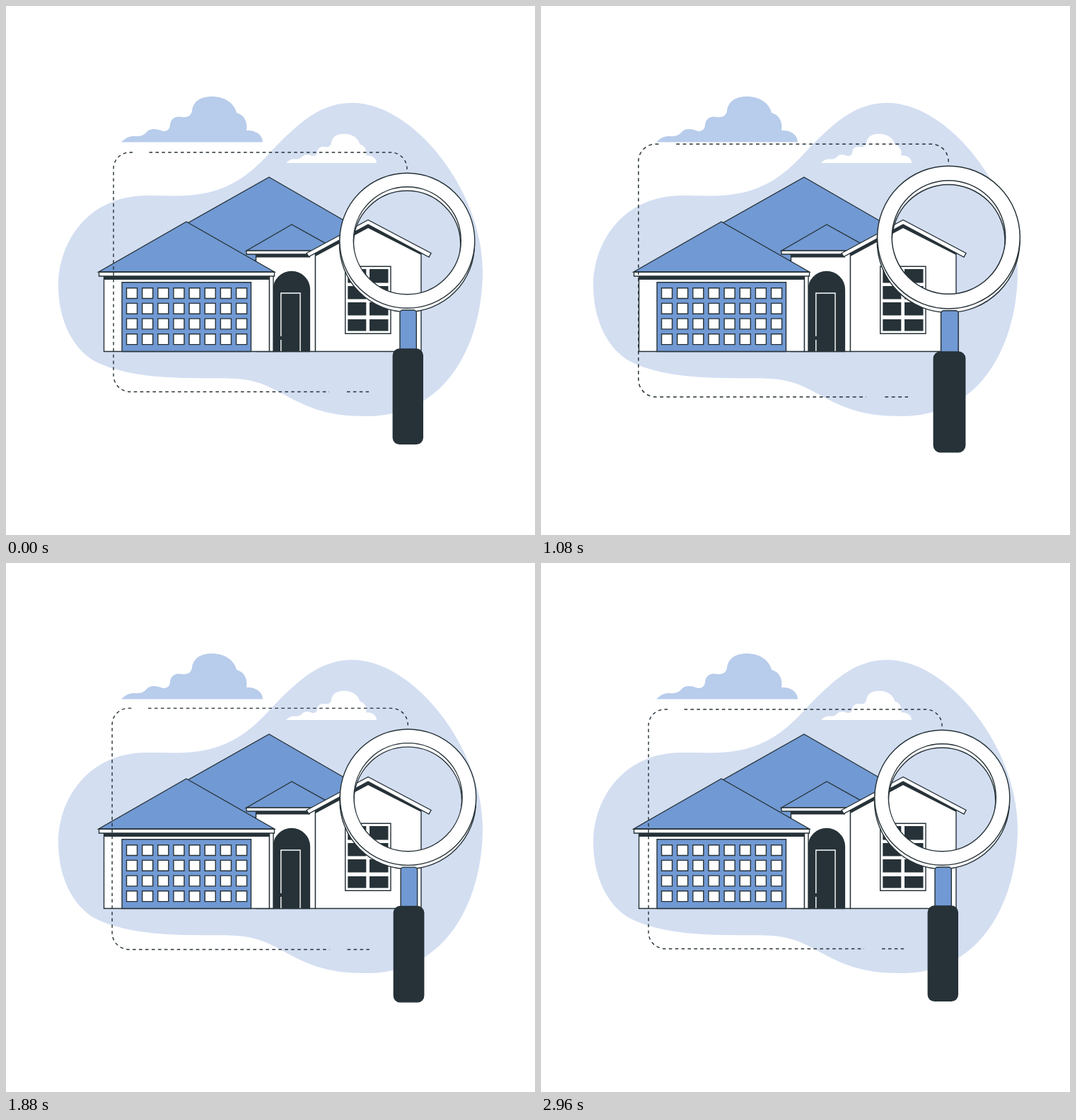
These frames come from a looping animation (748x748 px, 3 s). An HTML page with a canvas:

```html
<!DOCTYPE html>
<html lang="en">
<head>
<meta charset="utf-8">
<title>House search</title>
<style>
  html, body { margin: 0; width: 100%; height: 100%; overflow: hidden; background: #fff; }
  canvas { display: block; }
</style>
</head>
<body>
<canvas id="stage" width="748" height="748"></canvas>
<script>
const ctx = document.getElementById('stage').getContext('2d');
const INK = '#263238', BLUE = '#7199d3', PALE = '#d3def1', SKY = '#b8cceb', WHITE = '#fff';
const LOOP = 3000, FRAMES = 72;

const blob = new Path2D('M490 137C575 137 674 260 674 375C674 470 628 580 510 580' +
  'C450 580 425 567 385 545C345 522 318 527 265 526C210 526 160 520 125 502' +
  'C95 485 74 445 74 395C74 335 115 268 200 268C225 268 235 269 255 268' +
  'C330 264 360 220 385 195C420 160 448 137 490 137Z');

const cloud = new Path2D('M163 192.5C170 186 174 184 182 184C190 185 196 182 199 178' +
  'C203 173 212 173 219 176C226 179 232 175 232 168C233 159 240 155 249 157' +
  'C257 158 262 155 263 148C265 134 276 128 291 128C310 128 323 138 326 151' +
  'C337 154 342 164 340 176C351 175 363 181 363 192.5Z');

const dashes = new Path2D('M567 231V230A23 23 0 0 0 544 207H200' +
  'M179 207H175A23 23 0 0 0 152 230V522A23.5 23.5 0 0 0 175.5 545.5H457M482 545.5H513');

function paint(path, fill, line = INK) {
  if (fill) { ctx.fillStyle = fill; ctx.fill(path, 'evenodd'); }
  if (line) { ctx.strokeStyle = line; ctx.stroke(path); }
}

function shape(d, fill, line) {
  paint(new Path2D(d), fill, line);
}

function box(x1, y1, x2, y2, fill, line, radius = 0) {
  const p = new Path2D();
  p.roundRect(x1, y1, x2 - x1, y2 - y1, radius);
  paint(p, fill, line);
}

function ring(x, y, outer, inner) {
  const p = new Path2D();
  p.arc(x, y, outer, 0, Math.PI * 2);
  p.closePath();
  p.moveTo(x + inner, y);
  p.arc(x, y, inner, 0, Math.PI * 2);
  paint(p, WHITE);
}

function drawSky() {
  paint(blob, PALE, null);
  paint(cloud, SKY, null);
  ctx.save();
  ctx.translate(396, 222);
  ctx.scale(0.64, 0.64);
  ctx.translate(-163, -192.5);
  paint(cloud, WHITE, null);
  ctx.restore();
}

function drawGarage() {
  box(138.5, 378, 372.5, 488.5, WHITE);
  box(372.5, 380, 378, 488.5, WHITE);
  box(138.5, 382, 372.5, 387, INK, null);
  shape('M255 305L379.5 376H131Z', BLUE);
  box(131.5, 376.3, 379.5, 382, WHITE);
  box(164, 390.7, 346.5, 488.5, BLUE);
  for (let row = 0; row < 4; row++) {
    for (let col = 0; col < 8; col++) {
      const x = 170.5 + col * 22.15, y = 398.7 + row * 21.7;
      box(x, y, x + 15, y + 14.8, WHITE);
    }
  }
}

function drawPorch() {
  box(353.5, 350, 437.5, 488.5, WHITE);
  box(353.5, 351, 430, 355.5, INK, null);
  shape('M404 309L340 346H436L456 338Z', BLUE);
  box(340, 346, 432, 351, WHITE);
  shape('M378.2 488.5V401A25.6 25.6 0 0 1 429.4 401V488.5Z', INK);
  shape('M388.8 488V472M388.8 467V406H416V488', null, WHITE);
}

function drawGable() {
  shape('M437.5 488.5V347L512 307L587 349V488.5Z', WHITE);
  shape('M437.5 349V354L512 314L587 352V349L512 308Z', INK, null);
  shape('M425 349.5L512 302.5L601 349.5L598 355L512 309L428 354.5Z', WHITE);
  box(479.7, 368.3, 544, 463.3, WHITE);
  for (const y of [372, 396, 419, 443]) {
    const h = y === 372 ? 19.5 : y === 443 ? 16.5 : 18.5;
    box(483.3, y, 509.3, y + h, INK, null);
    box(514, y, 540.5, y + h, INK, null);
  }
}

function drawHouse() {
  shape('M372 242L495 313L440 360H300L200 339Z', BLUE);
  drawPorch();
  drawGarage();
  drawGable();
}

function drawLens(scale) {
  ctx.save();
  ctx.translate(405, 416);
  ctx.scale(scale, scale);
  ctx.translate(-405, -416);
  ctx.setLineDash([4.6, 4.3]);
  paint(dashes, null);
  ctx.setLineDash([]);
  ring(567, 337, 95.5, 75.7);
  ring(567.3, 331.8, 95.5, 76);
  box(557, 430, 580.3, 490, BLUE, INK, 4);
  box(547.3, 485, 589.3, 619.3, INK, INK, 9);
  ctx.restore();
}

// Two uneven pulses; k counts steps of the loop.
function pulse(k) {
  if (k < 14) return 1.1 - 0.1 * (1 - k / 14) ** 1.5;
  if (k < 41.4) return 1.1 - 0.1 * (k - 14) / 27.4;
  if (k < 54.4) return 1 + 0.099 * ((k - 41.4) / 13) ** 2;
  return 1.099 - 0.099 * Math.min(1, (k - 54.4) / 16.6) ** 1.28;
}

function draw(now) {
  const t = now % LOOP;
  const k = Math.floor((t + 5) * FRAMES / LOOP) % FRAMES;
  ctx.fillStyle = WHITE;
  ctx.fillRect(0, 0, 748, 748);
  ctx.lineWidth = 1.4;
  ctx.lineJoin = 'miter';
  drawSky();
  drawHouse();
  drawLens(pulse(k));
}

let start;
function tick(now) {
  start ??= now;
  draw(now - start);
  requestAnimationFrame(tick);
}
draw(0);
requestAnimationFrame(tick);
</script>
</body>
</html>
```
